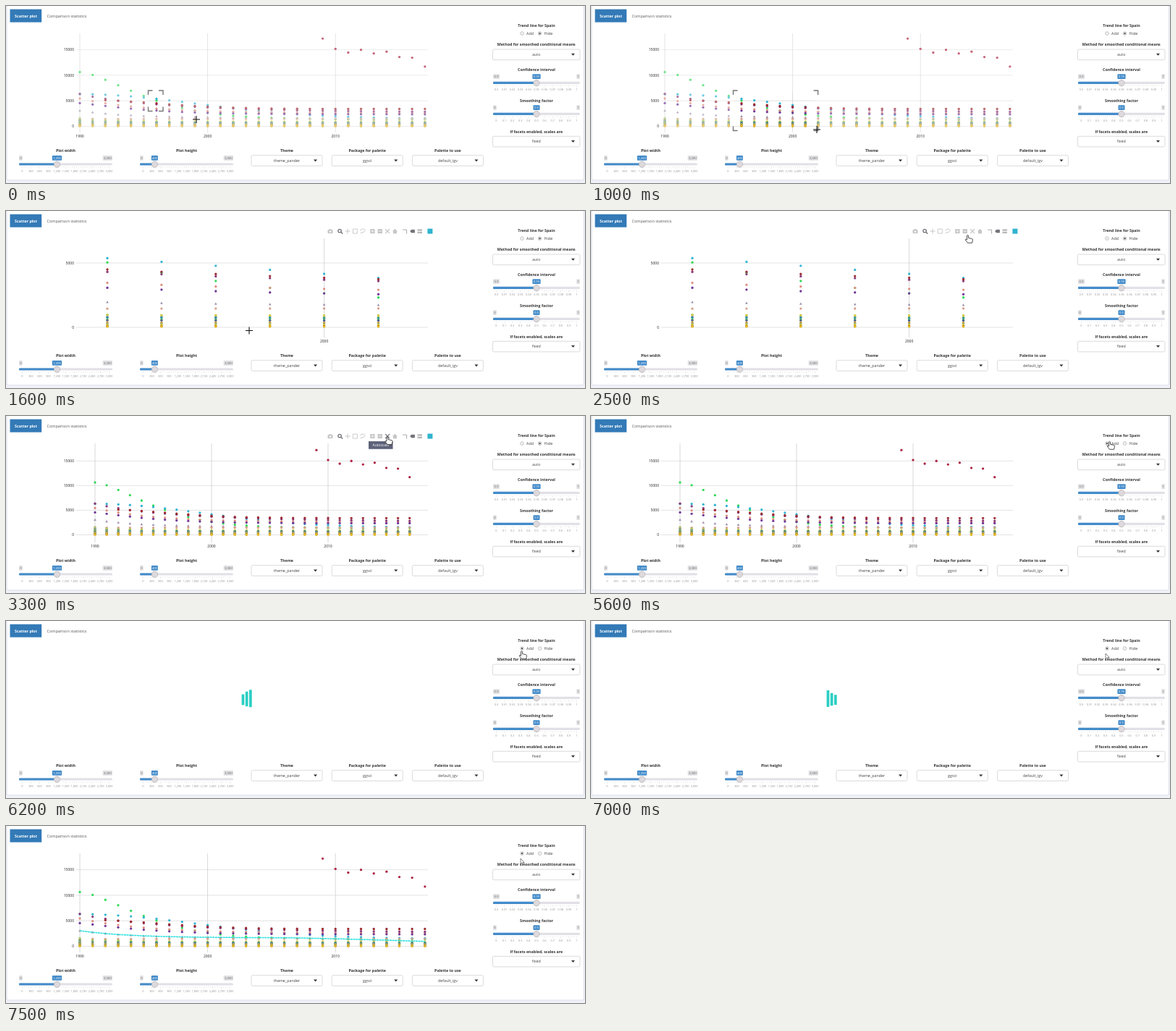
An HTML page that plays this animation: 800x245 px, repeating every 8 s.

```html
<!DOCTYPE html>
<html lang="en">
<head>
<meta charset="utf-8">
<title>Scatter plot controls</title>
<style>
  html, body { margin: 0; width: 100%; height: 100%; overflow: hidden; background: #fff; }
  svg { display: block; width: 800px; height: 245px; }
  text { font-family: "Open Sans", "Noto Sans", sans-serif; font-size: 5.35px; fill: #444; }
  .mid { text-anchor: middle; }
  .end { text-anchor: end; }
  .bold { font-weight: 700; font-size: 5.3px; fill: #333; }
  .axis { font-size: 5px; fill: #222; }
  .tick { font-size: 3.8px; fill: #909090; }
  .tag { font-size: 4.3px; }
</style>
</head>
<body>
<svg viewBox="0 0 800 245">
  <g id="panel"></g>
  <g id="home"></g>
  <g id="zoomed"></g>
  <g id="auto"></g>
  <path id="trend" fill="none" stroke="#25e0dc" stroke-width="1.5" stroke-dasharray="3 .6"/>
  <path id="shade" fill="#fff" fill-opacity=".3" fill-rule="evenodd"/>
  <path id="corners" fill="none" stroke="#777" stroke-width="1.4"/>
  <g id="modebar"></g>
  <g id="tip">
    <path d="M501 35h24l2-2.2 2 2.2h5.5v10.7H501z" fill="#5d6179"/>
    <text x="517.8" y="42.2" class="mid" style="fill:#fff;font-size:5px">Autoscale</text>
  </g>
  <g id="loader"></g>
  <g id="cursor">
    <path id="cross" d="M-5 0H5M0-5V5" stroke="#111" stroke-width="1.1"/>
    <path id="hand" d="M-1 .7Q0-.6 1 .7V4L6 5.2Q7.2 5.6 7 7L6 11H0L-3.4 6.5Q-3 5.2-1 6.6Z"
      fill="#fff" stroke="#222" stroke-width=".8"/>
    <path id="arrow" d="M0 0V7.4L1.7 5.9 2.9 8.6 4.1 8.1 2.9 5.5H5.2Z"
      fill="#fff" stroke="#333" stroke-width=".6"/>
  </g>
</svg>
<script>
const $ = id => document.getElementById(id);
const show = (id, on) => $(id).style.display = on ? '' : 'none';
const lerp = (a, b, k) => a + (b - a) * k;
const clamp = k => Math.max(0, Math.min(1, k));
const smooth = k => k * k * (3 - 2 * k);
const range = n => [...Array(n).keys()];
const text = (x, y, s, cls = '', style = '') =>
  `<text x="${x}" y="${y}" class="${cls}" style="${style}">${s}</text>`;
const rect = (x, y, w, h, fill, extra = '') =>
  `<rect x="${x}" y="${y}" width="${w}" height="${h}" fill="${fill}" ${extra}/>`;
const path = (d, stroke, width = 1, fill = 'none') =>
  `<path d="${d}" stroke="${stroke}" stroke-width="${width}" fill="${fill}"/>`;
const circle = (x, y, r, fill, extra = '') =>
  `<circle cx="${x}" cy="${y}" r="${r}" fill="${fill}" ${extra}/>`;

// ---- Controls ----
function slider(x, w, y, label, min, max, value, share, step) {
  const tag = (mid, s, fill, ink) => {
    const tw = s.length * 2.15 + 2.6;
    const left = Math.max(x, Math.min(x + w - tw, mid - tw / 2));
    return rect(left, y - 12, tw, 6.8, fill, 'rx="1"') +
      text(left + tw / 2, y - 7, s, 'mid tag', `fill:${ink}`);
  };
  const format = n => (+n.toFixed(2)).toLocaleString('en-US');
  const inner = x + 4.4, span = w - 8.8, knob = inner + span * share;
  const ticks = range(41).map(i => path(`M${inner + span * i / 40} ${y + 3}v${i % 4 ? 1.5 : 3}`, '#ccc', .4));
  const numbers = range(11).map(i => text(inner + span * i / 10, y + 11, format(min + step * i), 'mid tick'));
  return text(x + w / 2, y - 16.6, label, 'mid bold') +
    rect(x, y - 1.6, w, 3.2, '#e2e0e6', 'rx="1.5"') +
    rect(x, y - 1.6, knob - x, 3.2, '#428bca', 'rx="1"') +
    tag(x, format(min), '#e0e0e3', '#666') + tag(x + w, format(max), '#e0e0e3', '#666') +
    tag(knob, format(value), '#428bca', '#fff') + ticks.join('') + numbers.join('') +
    circle(knob, y + .2, 4.2, '#ddd9dc', 'stroke="#b4b0b2" stroke-width=".7"');
}

function select(x, y, w, value, label) {
  const cx = x + w / 2;
  return text(cx, y - 4.7, label, 'mid bold') +
    rect(x, y, w, 14.6, '#fff', 'stroke="#d2d2d2" stroke-width=".8" rx="1.6"') +
    text(cx, y + 9.1, value, 'mid') +
    `<path d="M${x + w - 12} ${y + 5.8}h5l-2.5 3z" fill="#333"/>`;
}

const radio = (x, label) =>
  circle(x, 38, 2.4, '#f1f1f1', 'stroke="#b4b4b4" stroke-width=".7"') + text(x + 6.1, 40, label);

$('panel').innerHTML =
  rect(0, 0, 800, 245, '#f0f2f9') +
  rect(1, -4, 797.5, 245, '#fff', 'stroke="#dcdfea" rx="2"') +
  rect(5.5, 4.5, 43.7, 18, '#337ab7') +
  text(27.5, 16.2, 'Scatter plot', 'mid bold', 'fill:#fff') +
  text(56.5, 16.2, 'Comparison statistics', '', 'font-size:5.5px;fill:#555') +
  text(733, 29.3, 'Trend line for Spain', 'mid bold') +
  radio(713, 'Add') + radio(737.5, 'Hide') + circle(0, 38, 1.2, '#555', 'id="choice"') +
  select(672.5, 60, 120.5, 'auto', 'Method for smoothed conditional means') +
  slider(673, 120, 106.3, 'Confidence interval', .9, 1, .95, .5, .01) +
  slider(673, 120, 149.3, 'Smoothing factor', 0, 1, .5, .5, .1) +
  select(672.5, 180.3, 120.5, 'fixed', 'If facets enabled, scales are') +
  slider(18, 129, 219, 'Plot width', 0, 3000, 1200, .4, 300) +
  slider(185, 129, 219, 'Plot height', 0, 3000, 400, .133, 300) +
  ['Theme|theme_pander', 'Package for palette|ggsci', 'Palette to use|default_igv'].map((s, i) => {
    const [label, value] = s.split('|');
    return select(339 + 111.2 * i, 206.7, 98, value, label);
  }).join('');

// ---- Data: each series is a curve over years since 1990 ----
let seed = 7;
const random = () => (seed = seed * 16807 % 2147483647) / 2147483647;
const decay = (from, to, pace, power = 1) => year => to + (from - to) * Math.exp(-((year / pace) ** power));
const spain = year => decay(3050, 1650, 4)(year) - 700 * Math.max(0, (year - 16) / 11) ** 1.3;
const outlier = year => {
  const d = year - 19;
  return 14750 + 2750 * Math.exp(-3 * d) - 300 * Math.cos(Math.PI * d) - .67 * d ** 4;
};
const series = [
  { color: '#32d957', value: decay(10630, 1400, 6.3, 1.5) },
  { color: '#32b4d4', value: decay(6300, 1500, 13, 2) },
  { color: '#dd8f80', value: decay(5450, 2600, 5) },
  { color: '#8a3a7a', value: decay(6350, 2700, 7.5, .9) },
  { color: '#703798', value: decay(4550, 2350, 5.5, 1.2) },
  { color: '#9e2b31', value: decay(5200, 3400, 8.5, 2), first: 2 },
  { color: '#ad2342', value: outlier, first: 19 }
];
const lowColors = ('#83cf62 #d7a18b #c4d84d #4b6fb5 #d4c84a #2e8bad #dcc83c #5dbb74 #3f5f9c ' +
  '#d9bf38 #d88c4e #3fa8a4 #e2ca36 #cc9e1d #d8c636 #a32e25 #e6c92c').split(' ');
lowColors.forEach((color, i) => {
  const top = 60 + 1500 * (1 - i / (lowColors.length - 1)) ** 1.6;
  series.push({ color, value: decay(top, top * (.4 + .7 * random()), 6) });
});

// ---- Plot views: position of 1990 and zero, pixels per year and per 5000 ----
const views = {
  home: { x: 102, dx: 17.66, y: 166.5, dy: 35.3 },
  zoomed: { x: -309.4, dx: 74.9, y: 161, dy: 89 },
  auto: { x: 123, dx: 16.1, y: 164.5, dy: 34.1 }
};
const area = { l: 97, r: 583, t: 38, b: 175 };
const px = (v, year) => v.x + v.dx * year;
const py = (v, value) => v.y - v.dy * value / 5000;

function plot(v) {
  const visible = year => px(v, year) > area.l && px(v, year) < area.r;
  let out = '';
  for (let n = 0; n <= 15000; n += 5000) {
    const y = py(v, n);
    if (y > area.t) out += path(`M${area.l} ${y}H${area.r}`, '#dcdcdc', .8) + text(94, y + 1.8, n, 'end axis');
  }
  for (const year of [0, 10, 20].filter(visible)) {
    const x = px(v, year);
    out += path(`M${x} ${area.t}V${area.b}`, '#cfcfcf', .8) + text(x, 181.6, 1990 + year, 'mid axis');
  }
  for (const year of range(28).filter(visible)) {
    const x = px(v, year);
    out += `<path d="M${x} ${py(v, spain(year)) - 1.8}l1.8 3.2h-3.6z" fill="#9c8fa9"/>`;
    for (const { color, value, first = 0 } of series)
      if (year >= first) out += circle(x, py(v, value(year)), 1.65, color);
  }
  return out;
}
for (const id in views) $(id).innerHTML = plot(views[id]);
$('trend').setAttribute('d', 'M' + range(28).map(year =>
  `${px(views.home, year)} ${py(views.home, spain(year))}`).join('L'));

// ---- Mode bar: icons drawn around their own centre ----
const pale = '#c6c6c6', dark = '#74747a';
const box = path('M-3-3h6v6h-6z', pale, .9);
const block = rect(-3.2, -3, 6.4, 6, pale);
const iconGroups = [
  [rect(-3.5, -2, 7, 5, pale, 'rx="1"') + rect(-1.5, -3, 3, 2, pale) + circle(0, .5, 1.3, '#fff')],
  [circle(-.6, -.5, 2.2, 'none', `stroke="${dark}" stroke-width="1.3"`) + path('M1 1l2.6 2.6', dark, 1.4),
    path('M-3.5 0h7M0-3.5v7', pale), box,
    path('M-3-.5q0-2.5 3.5-2.5t2.7 2.5-4 2q-2.5 0-1 2', pale, .9)],
  [block + path('M-1.8 0h3.6M0-1.8v3.6', '#fff', .8), block + path('M-1.8 0h3.6', '#fff', .8),
    `<g id="scaleIcon">${path('M-3-3l6 6M3-3l-6 6', 'currentColor', 1.1)}</g>`,
    `<path d="M-3.5 0L0-3.2 3.5 0h-1v3.2h-5V0z" fill="${pale}"/>`],
  [path('M-3-2h5.5v5.5', '#aaa'), `<path d="M-3.3 0l2-2.3h4.8v4.6h-4.8z" fill="${dark}"/>`,
    rect(-3.3, -2.7, 6.5, 2.2, '#b5b5b5') + rect(-3.3, .7, 6.5, 2.2, '#b5b5b5')],
  [rect(-3, -3.5, 7, 7, '#2fb3cf')]
];
let iconX = 448;
$('modebar').innerHTML = iconGroups.map(group => {
  const out = group.map((icon, i) => `<g transform="translate(${iconX + 10.35 * i} 28)">${icon}</g>`);
  iconX += 10.35 * group.length + 3.3;
  return out.join('');
}).join('');

// ---- Motion ----
const released = 1200, rescaled = 3000, chosen = 5500, hidden = 5800, redrawn = 7300;
const moves = [
  { from: 0, to: 800, x: 312, y: 171 },
  { from: released, to: 1600, x: 336, y: 165.5 },
  { from: 1700, to: 2600, x: 527, y: 28.5 },
  { from: 3800, to: 4400, x: 717, y: 34.5 },
  { from: chosen, to: 6000, x: 712.5, y: 41.5 },
  { from: 6400, to: 6700, x: 711, y: 45 }
];

function moveCursor(t) {
  let x = 263, y = 157;
  for (const move of moves) {
    const k = smooth(clamp((t - move.from) / (move.to - move.from)));
    x = lerp(x, move.x, k);
    y = lerp(y, move.y, k);
  }
  $('cursor').setAttribute('transform', `translate(${x} ${y})`);
  const kind = t < 2500 ? 'cross' : t >= 6600 || (t >= 4100 && t < 4400) ? 'arrow' : 'hand';
  for (const id of ['cross', 'hand', 'arrow']) show(id, id === kind);
}

function drawSelection(t) {
  const k = 1 - (1 - clamp(t / 900)) ** 1.6;
  const l = 197.5, top = 118, r = lerp(216, 312.6, k), b = lerp(144.5, 171.5, k);
  $('shade').setAttribute('d', `M97 38H583V175H97zM${l} ${top}H${r}V${b}H${l}z`);
  const corner = (x, y, sx, sy) => `M${x} ${y + 6 * sy}v${-6 * sy}h${6 * sx}`;
  $('corners').setAttribute('d', corner(l - 1, top - 1, 1, 1) + corner(r + 1, top - 1, -1, 1) +
    corner(l - 1, b + 1, 1, -1) + corner(r + 1, b + 1, -1, -1));
}

// The bars stall while the page is busy redrawing
function drawLoader(t) {
  const time = t < 7000 ? Math.min(t, 6700) : Math.min(t, 7100) - 200;
  $('loader').innerHTML = range(3).map(i => {
    const phase = ((time - hidden) / 1000 + .16 * (2 - i)) % 1;
    const k = smooth(clamp(1 - Math.abs(phase - .4) / .4));
    return rect(325.6 + 5.2 * i, 102.2 - 7 * k, 3.7, 13.8 + 10.2 * k, '#2bcfc4');
  }).join('');
}

function render(now) {
  const t = Math.floor(now % 8000 / 100) * 100;
  const selecting = t < released, waiting = t >= hidden && t < redrawn;
  const hovering = t >= 2600 && t < 4000;
  show('home', selecting || t >= redrawn);
  show('zoomed', t >= released && t < rescaled);
  show('auto', t >= rescaled && t < hidden);
  show('trend', t >= redrawn);
  show('shade', selecting);
  show('corners', selecting);
  show('modebar', t >= released && t < 4100);
  show('tip', hovering);
  show('loader', waiting);
  $('scaleIcon').style.color = hovering ? dark : pale;
  $('choice').setAttribute('cx', t < chosen ? 737.5 : 713);
  if (selecting) drawSelection(t);
  if (waiting) drawLoader(t);
  moveCursor(t);
}

const start = performance.now();
function tick() {
  render(performance.now() - start);
  requestAnimationFrame(tick);
}
tick();
</script>
</body>
</html>
```
